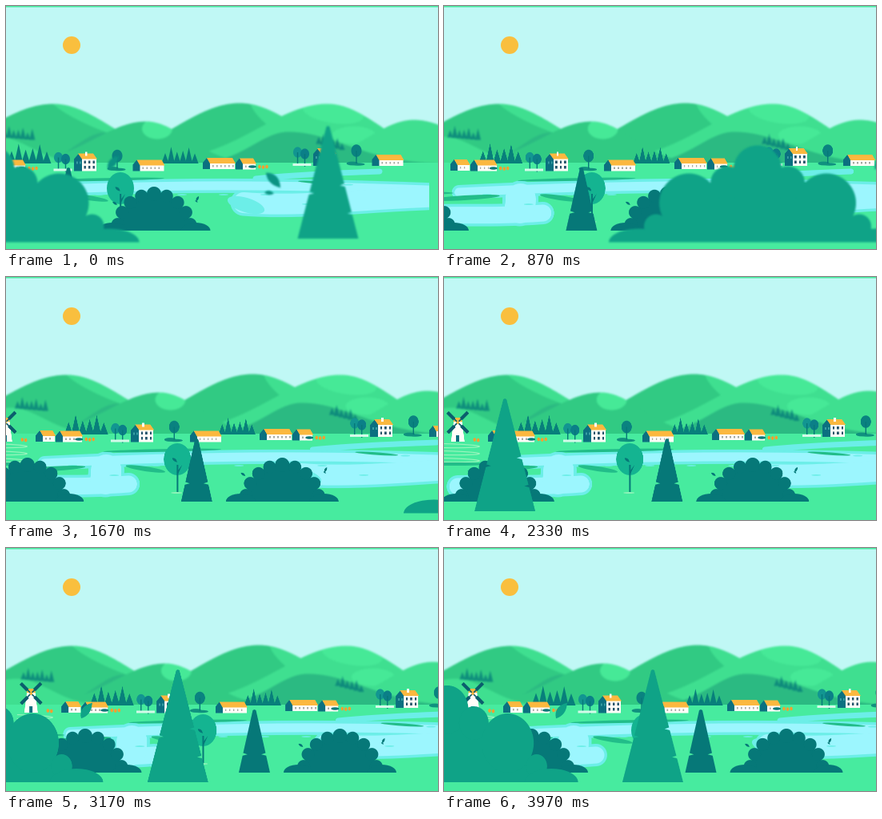
An HTML page with a canvas that plays this animation: 540x304 px, repeating every 4010 ms.

```html
<!DOCTYPE html>
<html lang="en">
<head>
<meta charset="utf-8">
<title>Valley parallax</title>
<style>
html, body { margin: 0; width: 100%; height: 100%; overflow: hidden; background: #47eb9f; }
canvas { display: block; width: 540px; height: 304px; }
</style>
</head>
<body>
<canvas id="stage" width="540" height="304"></canvas>
<script>
const W = 540, H = 304, LOOP = 4010, FPS = 30, FRAMES = 120, RES = 2, PAD = 20;
const SHORE_Y = 196;
const view = document.getElementById('stage').getContext('2d');
const C = {
  sky: '#c0f8f5', sun: '#f9bf3e', grass: '#47eb9f', hill: '#3fdf90', hillDark: '#31ca83',
  hillDeep: '#2bba82', glow: '#46e997', bank: '#22bd89', water: '#9cf6fe', shore: '#6ceee8',
  dark: '#067878', front: '#0fa387', pine: '#087f7b', roof: '#fbb83f', wall: '#fffdf8',
  gable: '#0b7080', pumpkin: '#f5a030', crown: '#14b491', bush: '#10917f', pale: '#9af5bd'
};

function poly(g, color, pts) {
  g.fillStyle = color;
  g.beginPath();
  pts.forEach(p => g.lineTo(...p));
  g.fill();
}
function oval(g, color, x, y, rx, ry = rx, turn = 0) {
  g.fillStyle = color;
  g.beginPath();
  g.ellipse(x, y, rx, ry, turn, 0, 7);
  g.fill();
}
function rect(g, color, x, y, w, h) {
  g.fillStyle = color;
  g.fillRect(x, y, w, h);
}
function repeat(n, fn) {
  for (let i = 0; i < n; i++) fn(i);
}
function leaf(g, color, x, y, len, turn) {
  g.save();
  g.translate(x, y);
  g.rotate(turn);
  g.fillStyle = color;
  g.beginPath();
  g.moveTo(-len, 0);
  g.quadraticCurveTo(-len * 0.1, -len * 0.95, len, 0);
  g.quadraticCurveTo(-len * 0.1, len * 0.7, -len, 0);
  g.fill();
  g.restore();
}
function pines(g, x, y, count, step, h, slope = 0) {
  repeat(count, i => {
    const px = x + i * step, by = y + i * slope, ph = h * (0.8 + 0.2 * Math.cos(i * 2.4 + 3.6));
    poly(g, C.pine, [[px, by - ph], [px + step * 0.62, by], [px - step * 0.62, by]]);
  });
}

// Bell-shaped hill with its own spread on each side; patches stay inside it.
function hill(g, color, cx, top, left, right, ...patches) {
  const foot = SHORE_Y + 2;
  g.save();
  g.beginPath();
  g.moveTo(cx - 3 * left, foot);
  for (let x = cx - 3 * left; x <= cx + 3 * right; x += 2) {
    const d = (x - cx) / (x < cx ? left : right);
    g.lineTo(x, foot - (foot - top) * Math.exp(-d * d));
  }
  g.lineTo(cx + 3 * right, foot);
  g.fillStyle = color;
  g.fill();
  g.clip();
  patches.forEach(p => oval(g, ...p));
  g.restore();
}
function hills(g) {
  hill(g, C.hillDark, 84, 122, 117, 106, [C.hill, 139, 139, 64, 13, 0.4]);
  hill(g, C.hillDeep, 148, 158, 50, 60);
  hill(g, C.hillDark, 317, 121, 115, 107, [C.hill, 374, 143, 52, 18, 0.6]);
  hill(g, C.hill, 427, 122, 121, 98, [C.glow, 434, 133, 38, 13, 0.15], [C.glow, 460, 161, 27, 11]);
  hill(g, C.hill, 535, 142, 82, 90);
  hill(g, C.hillDark, 200, 144, 90, 73, [C.glow, 214, 153, 19, 13]);
  hill(g, C.hillDeep, 378, 157, 62, 101);
  hill(g, C.hillDark, 28, 161, 80, 75);
  hill(g, C.hill, 14, 163, 70, 60);
  g.globalAlpha = 0.8;
  pines(g, 23, 164, 7, 5.8, 15, 0.5);
  pines(g, 416, 172, 6, 5.8, 14, 1.5);
  g.globalAlpha = 1;
}

function cottage(g, x, y, w) {
  const h = 14, s = 9, eave = y + 7;
  poly(g, C.gable, [[x, y + h], [x, y + 6], [x + 5, y], [x + s, eave], [x + s, y + h]]);
  rect(g, C.wall, x + s, y + 6, w - s, h - 6);
  poly(g, C.roof, [[x + 5, y], [x + w - 3, y], [x + w + 1, eave], [x + s, eave]]);
  for (let wx = x + s + 3; wx < x + w - 2; wx += 5) rect(g, '#a4aaa5', wx, y + 9, 1.6, 2.5);
}
function manor(g, x, y) {
  const eave = y + 7;
  poly(g, C.gable, [[x, y + 22], [x, eave], [x + 6, y], [x + 11, eave], [x + 11, y + 22]]);
  rect(g, C.wall, x + 10, y + 6, 18, 16);
  poly(g, C.roof, [[x + 5, y], [x + 24, y], [x + 29, eave], [x + 10, eave]]);
  rect(g, C.wall, x + 14, y - 2, 2.5, 5);
  repeat(6, i => rect(g, '#23536a', x + 12.5 + i % 3 * 5.5, y + (i < 3 ? 9 : 15.5), 2.4, 3.5));
  repeat(2, i => rect(g, '#3aa0a5', x + 3 + i * 4, y + 10, 1.8, 3));
}
function roundTree(g, x, y, color, r = 6.5) {
  oval(g, color, x, y, r, r * 1.2);
  rect(g, C.dark, x - 0.7, y, 1.4, 16);
}
function treePair(g, x, y) {
  roundTree(g, x + 5, y + 6, '#129591', 5.5);
  roundTree(g, x + 14, y + 8, '#0b7f88', 5.5);
  rect(g, '#d3fae9', x - 1, y + 20, 23, 3);
}
function shrub(g, x, y, w) {
  oval(g, C.bush, x + w * 0.35, y, w * 0.3, 2.4);
  oval(g, C.bush, x + w * 0.65, y + 1, w * 0.35, 1.8);
}
function pumpkins(g, x, y, n = 3) {
  repeat(n, i => oval(g, C.pumpkin, x + i * 4.5, y + i % 2 * 0.6, 1.8, 2.3));
}
function windmill(g, x, y) {
  poly(g, C.wall, [[x - 5, y - 3], [x + 5, y - 3], [x + 8.5, y + 24], [x - 8.5, y + 24]]);
  poly(g, C.roof, [[x - 6, y - 1], [x - 3, y - 6], [x + 3, y - 6], [x + 6, y - 1]]);
  rect(g, C.gable, x - 2, y + 16, 4, 8);
  repeat(4, i => {
    g.save();
    g.translate(x, y);
    g.rotate(Math.PI / 4 + i * Math.PI / 2);
    rect(g, '#0b5e6d', 0, -0.8, 18, 1.6);
    rect(g, '#0b5e6d', 6, -2.3, 12, 4.2);
    g.restore();
  });
  oval(g, C.roof, x, y, 1.8);
}
// A hamlet repeats the same group of buildings, each time a little different.
function hamlet(g, x, y, small, long) {
  cottage(g, x, y, small);
  cottage(g, x + small + 1, y + 0.5, long);
  oval(g, C.dark, x + small + long - 3, y + 11, 5, 1.8);
  pumpkins(g, x + small + long + 6, y + 11);
}
function yard(g, x, y) {
  treePair(g, x, y);
  manor(g, x + 24.5, y + 1);
  shrub(g, x + 65, y + 20, 24);
  roundTree(g, x + 78.5, y + 4, '#0a8280');
  cottage(g, x + 98, y + 9, 39);
}

// Water is a set of round-ended strokes: a wide one for the shore, a narrower one on top.
function river(g) {
  const arms = [
    [18, [85, 233], [300, 222], [460, 223], [660, 231]],
    [33, [405, 246], [480, 252], [570, 240], [660, 238]],
    [28, [36, 262], [90, 261], [140, 263], [190, 259]],
    [45, [162, 241], [162, 246], [162, 249], [161, 253]],
    [7, [420, 216], [470, 211], [520, 209], [575, 207]]
  ];
  g.save();
  g.beginPath();
  g.rect(-PAD, SHORE_Y, 637 + PAD, H);
  g.clip();
  g.lineCap = 'round';
  for (const [color, trim] of [[C.shore, 0], [C.water, 7]]) {
    g.strokeStyle = color;
    for (const [width, a, b, c, d] of arms) {
      if (width <= trim) continue;
      g.lineWidth = width - trim;
      g.beginPath();
      g.moveTo(...a);
      g.bezierCurveTo(...b, ...c, ...d);
      g.stroke();
    }
  }
  oval(g, C.shore, 408, 249, 24, 9, 0.3);
  repeat(9, i => oval(g, C.shore, 120 + i * 52, 236 + 14 * Math.sin(i * 2.1) * (i < 2 || i > 6), 6, 0.9));
  g.restore();
  oval(g, C.bank, 232, 217, 74, 1.8, -0.02);
  oval(g, C.bank, 211, 240, 25, 3, 0.15);
  oval(g, C.bank, 92, 240, 44, 3, -0.06);
  oval(g, C.bank, 500, 221, 27, 1.6, 0.07);
}

function valley(g) {
  rect(g, C.grass, -PAD, SHORE_Y, 720, 128);
  pines(g, 115, 197, 6, 8.8, 25);
  pines(g, 307, 197, 6, 7.4, 21);
  river(g);
  g.strokeStyle = C.pale;
  g.lineWidth = 1.1;
  repeat(3, i => {
    g.beginPath();
    g.ellipse(15, 211 + i * 9, 48, 2.5, 0.02, -1.5, 1.5);
    g.stroke();
  });
  oval(g, C.bank, 30, 234, 48, 2);
  windmill(g, 36, 182);
  pumpkins(g, 57, 203.5, 2);
  hamlet(g, 74, 192, 24, 33);
  yard(g, 168.5, 183.5);
  hamlet(g, 354, 190, 40, 25);
  yard(g, 467.5, 177);
  // Tall round tree on the near bank
  oval(g, C.crown, 251, 228, 17, 20);
  rect(g, C.dark, 250.2, 235, 2, 34);
  poly(g, C.dark, [[251, 243], [257, 235], [252, 246]]);
  leaf(g, C.dark, 247.5, 229, 4, 0.7);
  oval(g, C.pale, 250, 270, 7, 0.9);
}

// Triangle fir with small wedges cut from its sides at the given heights.
function fir(g, color, x, y, h, half, cuts) {
  poly(g, color, [[x - 2, y + 1], [x, y], [x + 2, y + 1], [x + half, y + h], [x - half, y + h]]);
  g.globalCompositeOperation = 'destination-out';
  for (const [at, side] of cuts) {
    const ex = x + side * (half * at + 1), ey = y + h * at;
    poly(g, '#000', [[ex, ey - 1], [ex - side * 6, ey + 1], [ex + side * 2, ey + 3]]);
  }
  g.globalCompositeOperation = 'source-over';
}
function darkBush(g, x) {
  const foot = 281, n = 4, size = 46;
  g.save();
  g.beginPath();
  g.rect(x - 72, 220, 144, foot - 220);
  g.clip();
  oval(g, C.dark, x, foot, size, size);
  for (let i = -n; i <= n; i++) {
    const a = i * 0.35;
    oval(g, C.dark, x + size * Math.sin(a), foot - size * Math.cos(a), i ? 8 : 9);
  }
  [-1, 1].forEach(s => oval(g, C.dark, x + s * 52, foot, 18.5, 10));
  g.restore();
}
function middle(g) {
  darkBush(g, 109.5);
  darkBush(g, 428);
  fir(g, C.dark, 321, 202, 79, 19.5, [[0.7, 1], [0.7, -1]]);
  leaf(g, C.dark, 379, 247, 3.5, 0.6);
  leaf(g, C.dark, 482.5, 241, 3.5, -1.1);
  leaf(g, C.dark, 481, 244.5, 2, 0.6);
}

function bigBush(g, x, top, wide) {
  const foot = 122, lobes = [[0, 31, 30], [38, 48, 21], [86, 73, 37], [127, 102, 15]];
  g.save();
  g.translate(x, top);
  g.scale(wide, 1);
  g.beginPath();
  g.rect(-190, -5, 380, foot + 5);
  g.clip();
  poly(g, C.front, [[-150, foot], [-85, 60], [-35, 40], [35, 40], [85, 60], [150, foot]]);
  for (const s of [-1, 1]) {
    lobes.forEach(([dx, y, r]) => oval(g, C.front, s * dx, y, r));
    oval(g, C.front, s * 148, foot, 38, 17);
  }
  g.restore();
}
function front(g) {
  const cuts = [[0.52, 1], [0.59, -1], [0.77, 1]], wilt = '#0b9383';
  leaf(g, C.front, 147, 203.5, 12, -0.95);
  leaf(g, wilt, 1399, 218, 13, 0.8);
  leaf(g, wilt, 1394, 234, 6, 0.1);
  leaf(g, wilt, 1199, 196, 11, -0.9);
  bigBush(g, 4, 171, 0.88);
  fir(g, C.front, 261, 152, 141, 38, cuts);
  bigBush(g, 1045.5, 173.5, 1);
  fir(g, C.front, 1467.5, 150, 141, 38, cuts);
}

function layer(paint, travel, blur, drop = 0) {
  const art = document.createElement('canvas'), w = W + travel + 2 * PAD;
  art.width = w * RES;
  art.height = (H + PAD) * RES;
  const g = art.getContext('2d');
  g.scale(RES, RES);
  g.translate(PAD, drop);
  paint(g);
  return { art, w, travel, blur };
}
const layers = [
  layer(hills, 25, () => 1.1, 0.5),
  layer(valley, 108, () => 0.45),
  layer(middle, 243, () => 0),
  layer(front, 1065, speed => speed * 1.1)
];

// All layers slow down together with a quadratic ease-out.
function draw(now) {
  const frame = Math.min(FRAMES - 1, Math.floor((now % LOOP + 5) * FPS / 1000));
  const left = 1 - frame / FRAMES;
  rect(view, C.sky, 0, 0, W, H);
  oval(view, C.sun, 82, 49, 11);
  for (const { art, w, travel, blur } of layers) {
    const b = blur(left);
    view.filter = b > 0.3 ? `blur(${b}px)` : 'none';
    view.drawImage(art, -PAD - travel * left * left, 0, w, H + PAD);
  }
  view.filter = 'none';
  rect(view, C.grass, 0, 0, W, 1.5);
}
function tick() {
  draw(performance.now());
  requestAnimationFrame(tick);
}
tick();
</script>
</body>
</html>
```
